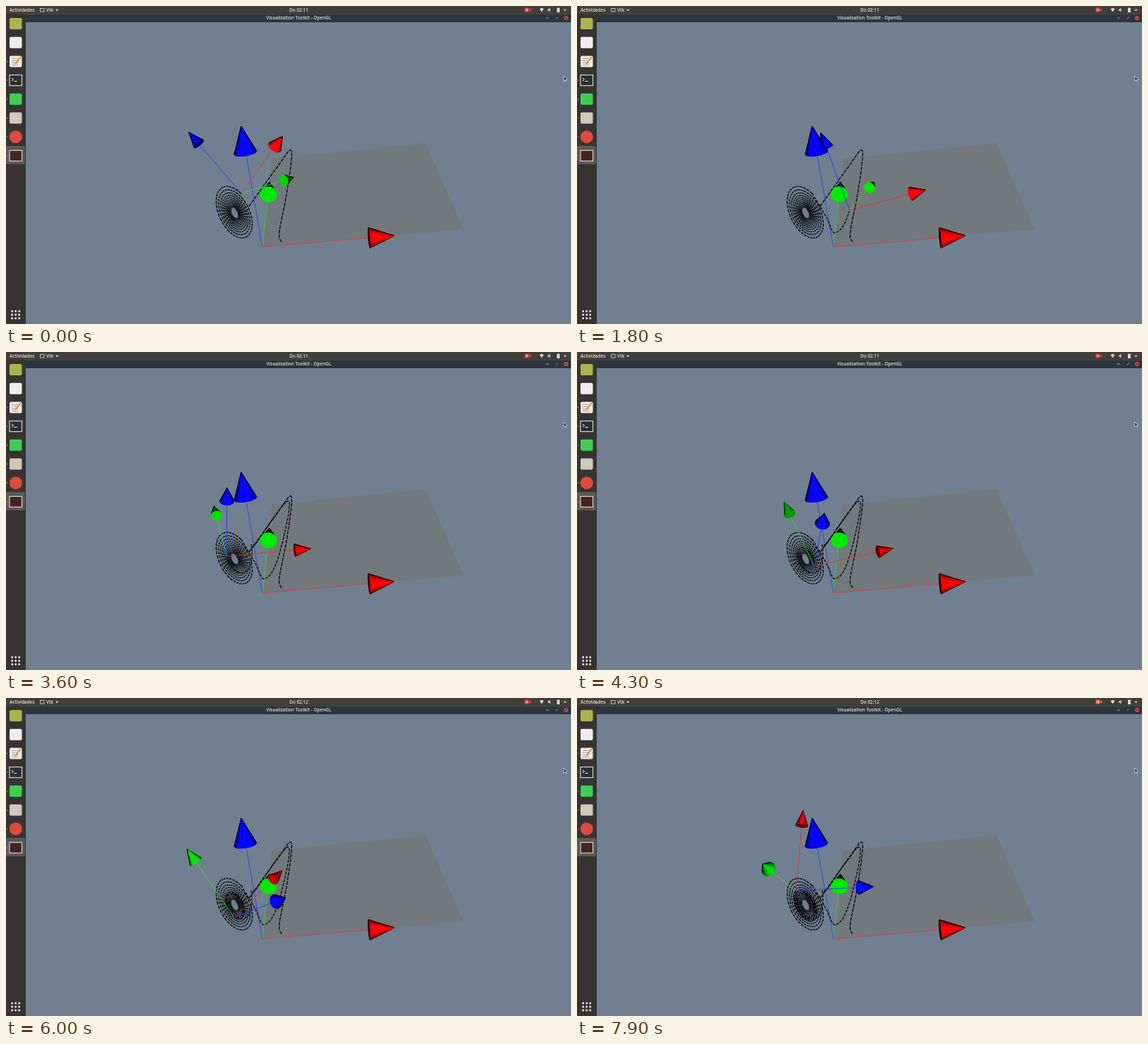
Write an HTML page with a canvas that moves like this. It is 800 by 450 pixels and loops after 8 s.

```html
<!DOCTYPE html>
<html lang="es">
<head>
<meta charset="utf-8">
<title>Moving frame</title>
<style>
html, body { margin: 0; width: 800px; height: 450px; overflow: hidden; background: #708090; }
canvas { display: block; }
</style>
</head>
<body>
<canvas id="stage" width="800" height="450"></canvas>
<script>
const g = document.getElementById('stage').getContext('2d');
const LOOP = 8, STEP = .1, ARM = 120, RAD = Math.PI / 180;
const RED = [255, 0, 0], GREEN = [0, 235, 0], BLUE = [0, 0, 255];

// seconds, then the red arm's heading and lift and the roll around it, in degrees
const turns = [[0, 54, 34, -23], [1.8, 15, 22, 14], [3.6, 5, -7, 37], [6, 44, -38, 105], [7.9, 85, -18, 155]];
// seconds, x, y of the moving origin on the right lobe
const lobe = [[0, 333, 265], [.45, 352, 297], [.9, 365, 321], [1.8, 386, 289], [2.3, 400, 211], [2.8, 350, 276]];
// order, x, y along the trail left by the lap before
const lap = [[0, 390, 334], [1, 387, 320], [2, 398, 262], [3, 404, 205], [4, 384, 228], [5, 343, 285]];

const sin = deg => Math.sin(deg * RAD), cos = deg => Math.cos(deg * RAD);

function spline(keys, t) {
  const last = keys.length - 1;
  let i = 0;
  while (i < last - 1 && t > keys[i + 1][0]) i++;
  const a = keys[i], b = keys[i + 1], p = keys[Math.max(i - 1, 0)], n = keys[Math.min(i + 2, last)];
  const d = b[0] - a[0], s = Math.min(1, (t - a[0]) / d), q = 1 - s;
  return a.slice(1).map((v, j) => {
    const k = j + 1;
    const m0 = (b[k] - p[k]) / (b[0] - p[0]) * d, m1 = (n[k] - a[k]) / (n[0] - a[0]) * d;
    return v * (1 + 2 * s) * q * q + m0 * s * q * q + b[k] * s * s * (3 - 2 * s) - m1 * s * s * q;
  });
}

// Point on the tilted ellipse of the left lobe
const onSwirl = (deg, size) => [324 + 25.5 * size * cos(deg), 293 + 35.5 * size * sin(deg + 25.5)];

function place(t) {
  if (t < 2.8) return spline(lobe, t);
  const deg = 180 + 262 * (t - 3.6) + 20 * sin(82 * (t - 4));
  return onSwirl(deg, .44 + .05 * (t - 3.6) + Math.exp(-5 * (t - 2.8)));
}

const cross = (a, b) => [a[1] * b[2] - a[2] * b[1], a[2] * b[0] - a[0] * b[2], a[0] * b[1] - a[1] * b[0]];

// Unit axes: x right, y down, z towards the viewer
function axesAt(t) {
  const [head, lift, roll] = spline(turns, t);
  const red = [cos(head) * cos(lift), -sin(head) * cos(lift), sin(lift)];
  const side = [-sin(head), -cos(head), 0];
  const front = cross(side, red);
  const blue = side.map((v, i) => v * cos(roll) + front[i] * sin(roll));
  return [red, cross(red, blue), blue];
}

function path(points, fill, stroke, width = 1) {
  g.beginPath();
  points.forEach(p => g.lineTo(p[0], p[1]));
  if (fill) { g.closePath(); g.fillStyle = fill; g.fill(); }
  if (stroke) { g.strokeStyle = stroke; g.lineWidth = width; g.stroke(); }
}

function rect(x, y, w, h, color, r = 0) {
  g.fillStyle = color;
  g.beginPath();
  g.roundRect(x, y, w, h, r);
  g.fill();
}

function disc(x, y, r, color) {
  g.fillStyle = color;
  g.beginPath();
  g.arc(x, y, r, 0, 7);
  g.fill();
}

function text(str, x, y, align = 'left') {
  g.font = '600 6.4px "Open Sans", sans-serif';
  g.textAlign = align;
  g.fillStyle = '#e6e4e0';
  g.fillText(str, x, y);
}

const rgb = (color, k) => `rgb(${color.map(c => Math.round(c * Math.min(1, Math.max(0, k))))})`;

// Cone lit from the viewer
function cone(base, tip, axis, r, color) {
  const slope = .4, N = 40, [ax, ay, az] = axis, flat = Math.hypot(ax, ay) || 1e-6;
  const u = [-ay / flat, ax / flat], v = [-az * ax / flat, -az * ay / flat];
  const rim = deg => [0, 1].map(k => base[k] + r * (u[k] * cos(deg) + v[k] * sin(deg)));
  const ring = [];
  for (let i = 0; i < N; i++) {
    const deg = i * 360 / N, next = deg + 360 / N;
    const nz = (flat * sin(deg + 180 / N) + slope * az) / Math.hypot(1, slope);
    ring.push(rim(deg));
    if (nz > 0) {
      const shade = rgb(color, .04 + 1.15 * nz);
      path([tip, rim(deg), rim(next)], shade, shade, .4);
    }
  }
  if (az < 0) path(ring, rgb(color, .04 - 1.15 * az));
}

function dashed(points, dash) {
  g.setLineDash(dash);
  path(points, null, '#000', 1.3);
  g.setLineDash([]);
}

function oldTrail() {
  const curve = [];
  for (let s = 0; s <= 5; s += .05) curve.push(spline(lap, s));
  dashed(curve, [5, 1.5]);
  const at = a => onSwirl(-71 - a, 1.08 * Math.pow(.87, a / 360));
  for (let a = 0; a < 360 * 12; a += 9.7) path([at(a), at(a + 3.6), at(a + 7.2)], null, '#000', 1.4);
}

function newTrail(t) {
  const curve = [];
  for (let s = 0; s <= t; s += .02) curve.push(place(s));
  dashed(curve, [4, 1.6]);
}

function worldAxes() {
  path([[376, 216], [594, 194], [648, 316], [363, 341]], '#72797c');
  path([[363, 341], [514, 328]], null, '#f03038', .8);
  path([[363, 341], [371, 270]], null, '#20e030', .8);
  path([[363, 341], [340, 210]], null, '#3038e8', .8);
  cone([514, 328], [550, 325], [.99, -.08, -.1], 14.7, RED);
  cone([371.5, 266.5], [373, 249], [.08, -.43, -.9], 12.2, GREEN);
}

function movingAxes(t) {
  const o = place(t), axes = axesAt(t);
  const arms = [RED, GREEN, BLUE].map((color, i) => {
    const axis = axes[i], along = k => [o[0] + axis[0] * ARM * k, o[1] + axis[1] * ARM * k];
    return { color, axis, tip: along(1), base: along(.81), r: 9.3 * (1 + .15 * axis[2]) };
  }).sort((a, b) => a.axis[2] - b.axis[2]);
  arms.forEach(a => path([o, a.base], null, rgb(a.color.map(c => c || 40), 1), .8));
  arms.forEach(a => cone(a.base, a.tip, a.axis, a.r, a.color));
}

function dock() {
  rect(0, 11, 28, 439, '#363432');
  rect(0, 198, 27, 26, '#5b5856', 2);
  const row = i => 25 + i * 26.7;
  ['#a8b450', '#eeeeec', '#eeeae2', '#2a3032', '#41cd52', '#cfc9ba', '#dd4b3c', '#452424'].forEach((color, i) => {
    if (i == 6) disc(13.8, row(i), 9, color);
    else rect(5, row(i) - 8, 17.5, 16, color, 2);
  });
  // text editor and terminal
  for (let y = 74; y < 84; y += 3) rect(8, y, 9, .8, '#999');
  path([[13, 82], [21, 72]], null, '#d98a2b', 2);
  path([[8, 102], [10.5, 104], [8, 106]], null, '#fff', 1);
  rect(11.5, 106, 4, 1, '#fff');
  g.strokeStyle = '#d4d2ce';
  g.lineWidth = 1.2;
  for (const i of [3, 7]) g.strokeRect(5, row(i) - 7.5, 17.5, 15);
  for (let i = 2; i < 8; i++) disc(1.6, row(i), .9, '#e0572b');
  for (let i = 0; i < 9; i++) disc(8.7 + i % 3 * 5, 432 + Math.floor(i / 3) * 5, 1.4, '#f2f2f0');
}

function bars(t) {
  const ink = '#d8d6d2', arrow = x => path([[x, 4.7], [x + 4.4, 4.7], [x + 2.2, 7.3]], ink);
  rect(0, 0, 800, 11.5, '#413f38');
  rect(28, 11.5, 772, 11.5, '#2d343d');
  text('Actividades', 5, 8);
  g.strokeStyle = ink;
  g.lineWidth = .8;
  g.strokeRect(48.5, 3.5, 5.5, 4.5);
  text('Vtk', 57, 8);
  arrow(70);
  text(t < 5.2 ? 'Do 02:11' : 'Do 02:12', 414.5, 8, 'center');
  text('Visualization Toolkit - OpenGL', 414.5, 19, 'center');

  // recorder, network, sound, battery, menu
  const rec = t < 6.8 ? '#e8474a' : '#ef6a45';
  rect(734.5, 2.5, 6, 6, rec, 1);
  disc(737.5, 5.5, 1.2, '#f4d8cc');
  path([[740, 5.5], [743.5, 3], [743.5, 8]], rec);
  path([[755.5, 4], [758.5, 2.8], [761.5, 4], [758.5, 8.3]], ink);
  path([[767, 4.5], [768.5, 4.5], [770.5, 2.7], [770.5, 8.3], [768.5, 6.5], [767, 6.5]], ink);
  rect(780, 2.5, 4, 6.5, ink, .6);
  arrow(789.3);

  rect(765, 16.6, 3.5, .9, '#b8bcc2');
  path([[778.5, 18.5], [781.5, 15.5]], null, '#b8bcc2', .9);
  disc(793, 17, 3.1, '#d0454f');
  for (const d of [-1.2, 1.2]) path([[793 - d, 15.8], [793 + d, 18.2]], null, '#2d343d', .7);
}

function pointer() {
  path([[789.8, 99], [789.8, 106], [791.4, 104.7], [792.5, 107], [793.4, 106.5], [792.4, 104.3], [794.4, 104], [789.8, 99]],
    '#15181c', '#f0f2f4', .8);
}

function draw(time) {
  const t = Math.floor(time % LOOP / STEP + 1e-6) * STEP;
  rect(0, 0, 800, 450, '#708090');
  worldAxes();
  oldTrail();
  newTrail(t);
  movingAxes(t);
  cone([339, 207.5], [333, 170], [-.15, -.94, .3], 16.2, BLUE);
  dock();
  bars(t);
  pointer();
}

const start = performance.now();
function tick() {
  draw((performance.now() - start) / 1000);
  requestAnimationFrame(tick);
}
tick();
</script>
</body>
</html>
```
